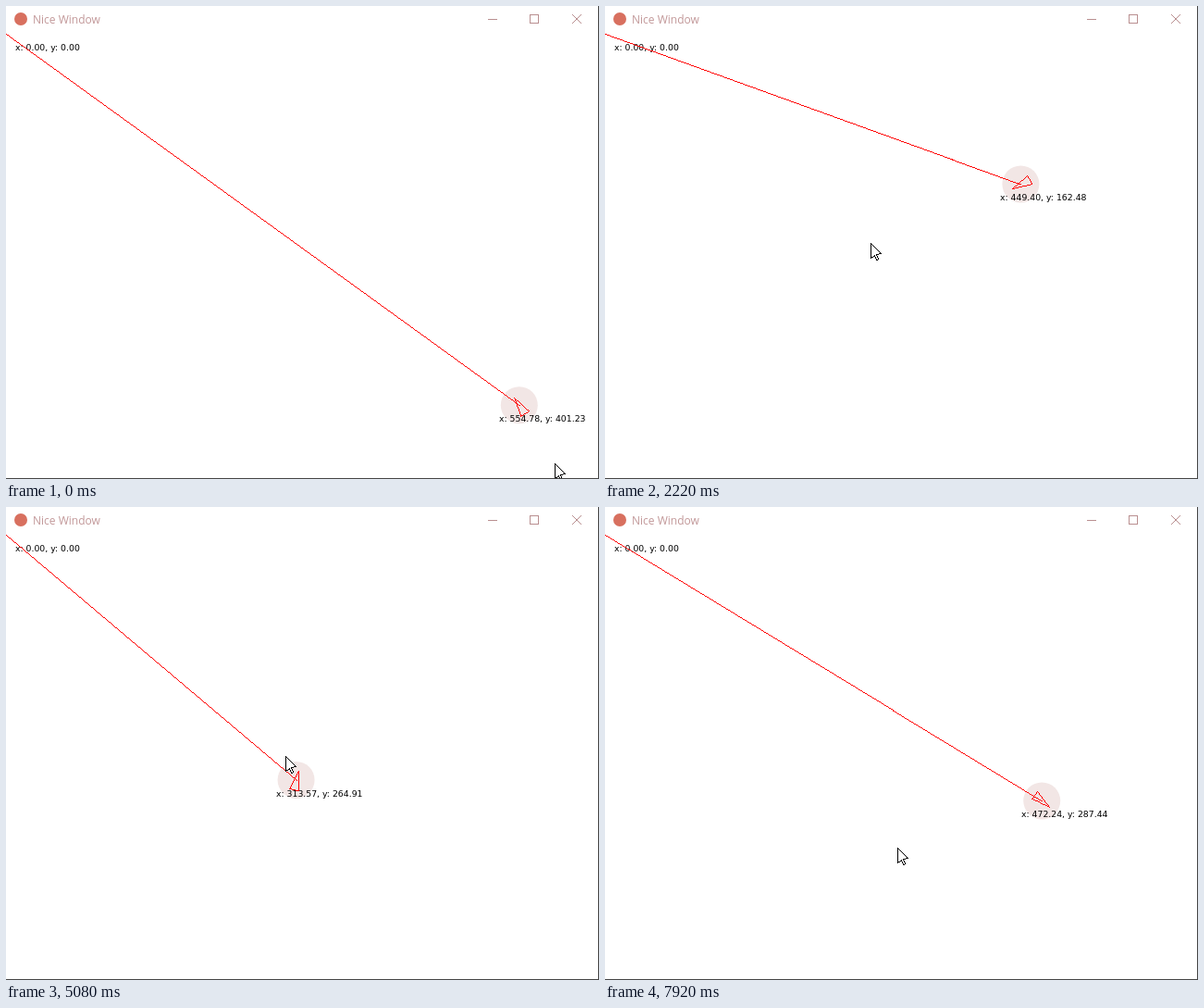
Animation of 641 by 511 pixels, one loop 7.99 s. Source, as an HTML page with a canvas:

```html
<!DOCTYPE html>
<html lang="en">
<head>
<meta charset="utf-8">
<title>Nice Window</title>
<style>
  html, body { margin: 0; width: 100%; height: 100%; overflow: hidden; background: #fff; }
  canvas { display: block; }
</style>
</head>
<body>
<canvas id="stage" width="641" height="511"></canvas>
<script>
const ctx = document.getElementById('stage').getContext('2d');
const LOOP = 7990, LAST_STEP = 114, STEP = 7920 / LAST_STEP, TITLE_HEIGHT = 30;

const key = (step, x, y, degrees, mouseX, mouseY) =>
  ({ step, x, y, angle: degrees * Math.PI / 180, mouseX, mouseY });

// Turning points of the ship, its heading there, and where the mouse pointer is
const keys = [
  key(0, 554.78, 401.23, -123, 593, 494),
  key(12, 425.56, 235.72, -149.5, 447, 282),
  key(32, 449.40, 162.48, 153, 287, 256),
  key(48, 252.60, 306.46, 123, 408, 279),
  key(63, 243.47, 401.80, -32, 353, 209),
  key(82, 319.24, 122.47, -108, 258, 321),
  key(96, 388, 48, 43, 400, 190),
  key(114, 472.24, 287.44, 39, 316, 368)
];

// The ship passes each key at the mean speed of the legs that meet there
const legSpeed = (a, b) => Math.hypot(b.x - a.x, b.y - a.y) / (b.step - a.step);
keys.forEach((here, i) => {
  const before = keys[i - 1], after = keys[i + 1];
  const arriving = before && legSpeed(before, here), leaving = after && legSpeed(here, after);
  const speed = ((arriving ?? leaving) + (leaving ?? arriving)) / 2;
  here.vx = speed * Math.cos(here.angle);
  here.vy = speed * Math.sin(here.angle);
});

// Cubic through p and q with end slopes u and v, as [value, slope]
function hermite(s, p, q, u = 0, v = 0) {
  const c2 = 3 * (q - p) - 2 * u - v, c3 = 2 * (p - q) + u + v;
  return [p + s * (u + s * (c2 + s * c3)), u + s * (2 * c2 + 3 * s * c3)];
}

function poseAt(step) {
  const i = Math.max(1, keys.findIndex(k => k.step >= step));
  const a = keys[i - 1], b = keys[i], span = b.step - a.step, s = (step - a.step) / span;
  const [x, vx] = hermite(s, a.x, b.x, a.vx * span, b.vx * span);
  const [y, vy] = hermite(s, a.y, b.y, a.vy * span, b.vy * span);
  const [mouseX] = hermite(s, a.mouseX, b.mouseX);
  const [mouseY] = hermite(s, a.mouseY, b.mouseY);
  return { x, y, angle: Math.atan2(vy, vx), mouseX, mouseY };
}

// Hard-edged one pixel line
function pixelLine([x0, y0], [x1, y1]) {
  const count = Math.ceil(Math.max(Math.abs(x1 - x0), Math.abs(y1 - y0)));
  for (let i = 0; i <= count; i++) {
    const s = i / count;
    ctx.fillRect(Math.round(x0 + (x1 - x0) * s), Math.round(y0 + (y1 - y0) * s), 1, 1);
  }
}

function outline(points, color) {
  ctx.fillStyle = color;
  points.forEach((p, i) => pixelLine(p, points[(i + 1) % points.length]));
}

function disc(x, y, r, color) {
  ctx.beginPath();
  ctx.arc(x, y, r, 0, 2 * Math.PI);
  ctx.fillStyle = color;
  ctx.fill();
}

function label(text, x, y, font, color) {
  ctx.font = font;
  ctx.fillStyle = color;
  ctx.fillText(text, x, y);
}

function coordinates(x, y, left) {
  label(`x: ${x.toFixed(2)}, y: ${y.toFixed(2)}`, left, Math.round(y) + TITLE_HEIGHT + 18,
    '9.3px "DejaVu Sans", sans-serif', '#000');
}

function drawTitleBar() {
  const tone = '#b98f90';
  disc(16, 14, 7, '#d8705f');
  label('Nice Window', 29, 19, '12px "Open Sans", sans-serif', '#c29899');
  outline([[521, 14], [530, 14]], tone);
  outline([[566, 9], [575, 9], [575, 18], [566, 18]], tone);
  ctx.strokeStyle = tone;
  ctx.beginPath();
  ctx.moveTo(612, 9);
  ctx.lineTo(622, 19);
  ctx.moveTo(622, 9);
  ctx.lineTo(612, 19);
  ctx.stroke();
}

function drawShip({ x, y, angle }) {
  const cy = y + TITLE_HEIGHT, cos = Math.cos(angle), sin = Math.sin(angle);
  const corner = (ahead, side) => [x + ahead * cos - side * sin, cy + ahead * sin + side * cos];
  disc(x, cy, 20, '#f2e6e5');
  coordinates(0, 0, 10);
  coordinates(x, y, Math.round(x) - 22);
  outline([[0, TITLE_HEIGHT], [x, cy]], '#f00');
  outline([corner(10, 0), corner(-10.5, -5), corner(-10.5, 5)], '#f00');
}

function drawPointer({ mouseX, mouseY }) {
  const left = Math.round(mouseX), top = Math.round(mouseY);
  const points = [[0, 0], [0, 16], [4, 13], [6, 18], [8, 17], [6, 12], [11, 11]]
    .map(([x, y]) => [left + x, top + y]);
  ctx.beginPath();
  points.forEach(([x, y]) => ctx.lineTo(x + 0.5, y + 0.5));
  ctx.fillStyle = '#fff';
  ctx.fill();
  outline(points, '#000');
}

function draw(time) {
  const step = Math.min(LAST_STEP, Math.floor((time % LOOP + 9) / STEP));
  const pose = poseAt(step);
  ctx.fillStyle = '#fff';
  ctx.fillRect(0, 0, 641, 511);
  drawTitleBar();
  drawShip(pose);
  drawPointer(pose);
  ctx.fillStyle = '#444';
  ctx.fillRect(640, 0, 1, 511);
  ctx.fillRect(0, 510, 641, 1);
  requestAnimationFrame(() => draw(performance.now() - start));
}

const start = performance.now();
draw(0);
</script>
</body>
</html>
```
